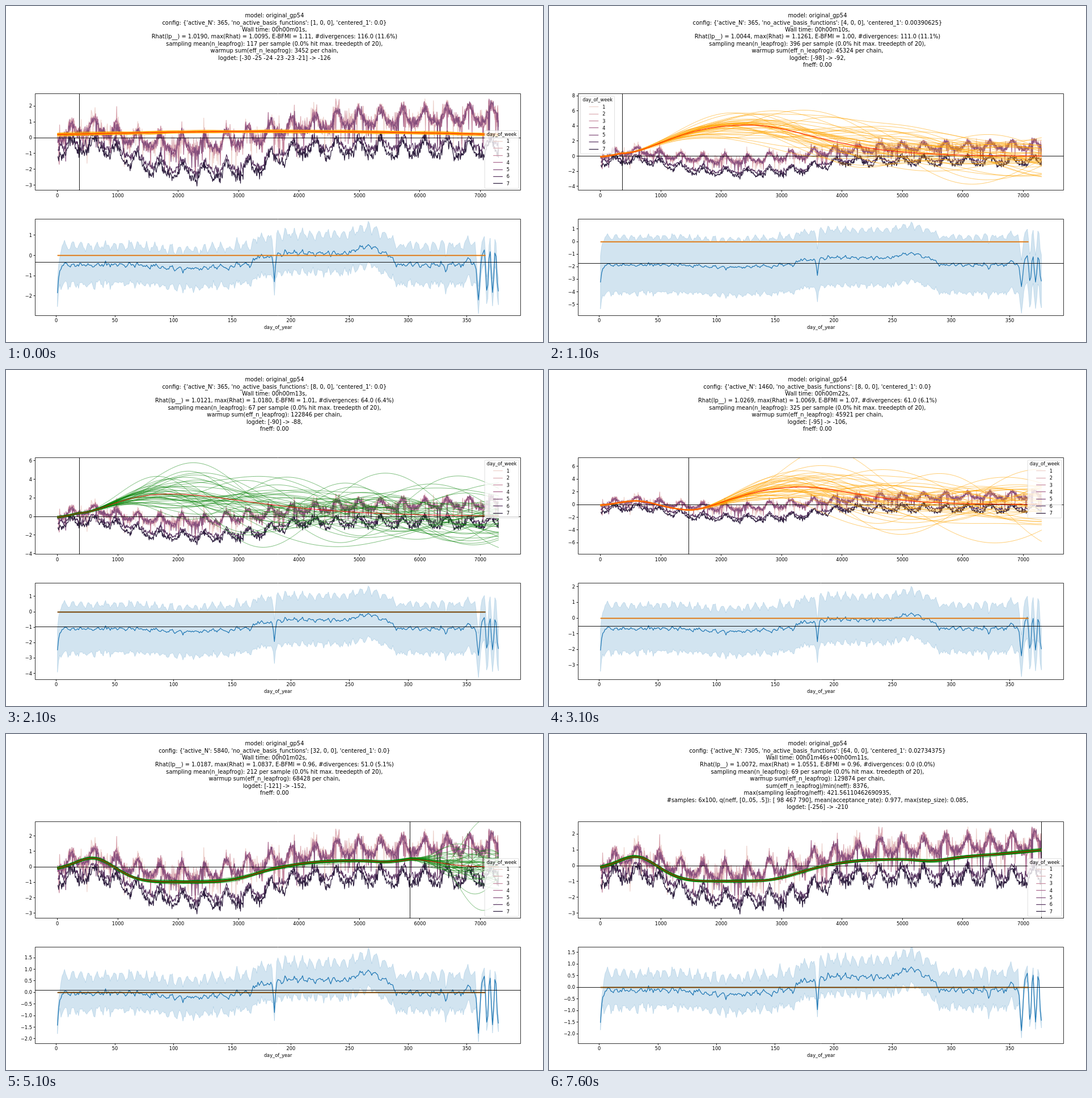
An HTML page with a canvas for the animation above (8.1 s loop, 947 by 592 pixels).

```html
<!DOCTYPE html>
<html lang="en">
<head>
<meta charset="utf-8">
<title>Model fits</title>
<style>
html, body { margin: 0; width: 100%; height: 100%; overflow: hidden; background: #fff; }
canvas { display: block; width: 947px; height: 592px; }
</style>
</head>
<body>
<canvas id="stage" width="947" height="592"></canvas>
<script>
const ctx = document.getElementById('stage').getContext('2d');
const LOOP = 8100, DAYS = 7305, TAU = Math.PI * 2;
const LEFT = 51.5, RIGHT = 907.5;
const TOP = { y: 154.5, b: 324.9, x: v => 90.6 + v * 0.10655 };
const BOT = { y: 375.2, b: 545.3, x: v => 88.7 + v * 2.068 };
const HUES = ['#edd1cb', '#dcacb3', '#c6899f', '#aa688f', '#824d7b', '#583561', '#2d1e3e'];
const FONT = '"DejaVu Sans", Verdana, sans-serif';

function seeded(a) {
  return () => {
    a = (a + 0x6D2B79F5) | 0;
    let t = Math.imul(a ^ (a >>> 15), 1 | a);
    t = (t + Math.imul(t ^ (t >>> 7), 61 | t)) ^ t;
    return ((t ^ (t >>> 14)) >>> 0) / 4294967296;
  };
}
const normal = r => Math.sqrt(-2 * Math.log(1 - r())) * Math.cos(TAU * r());
const bump = (x, c, w) => Math.exp(-(((x - c) / w) ** 2));
const shelf = (x, c, w) => Math.exp(-(((x - c) / w) ** 4));
const step = (x, c, w) => 1 / (1 + Math.exp((c - x) / w));

// Slow levels over the twenty years
const work = t => .2 + .55 * bump(t, 600, 350) - .75 * bump(t, 2250, 1100)
  + .8 * step(t, 3900, 450) + .45 * (t / DAYS) ** 2;
const rest = t => -.75 + .25 * bump(t, 600, 350) - 1.45 * shelf(t, 2400, 1250);
const fit = t => -.2 + .78 * bump(t, 600, 430) - .78 * shelf(t, 2150, 1150)
  + .6 * step(t, 3850, 250) + .6 * (Math.max(0, t - 4500) / 2805) ** 2 - .15 * bump(t, 5500, 350);

// Seven weekly series: five working days, then the lower weekend
function makeSeries() {
  const rnd = seeded(11);
  const common = Array.from({ length: 1043 }, () => normal(rnd) * .13);
  return HUES.map((_, d) => {
    const weekday = d < 5;
    let drift = 0;
    return common.map((shared, i) => {
      const t = i * 7 + d + 1, a = TAU * (t - 245) / 365.25;
      const season = .46 * Math.cos(a) + .15 * Math.cos(2 * a + .4);
      drift = .6 * drift + normal(rnd) * .1;
      let v = shared + drift + season * (d === 5 ? .75 : 1);
      v += weekday ? work(t) : rest(t) + (d === 5 ? .33 : 0);
      if (d < 4) v += normal(rnd) * .13 + (d < 2 && rnd() < .06 ? .6 : 0);
      if (weekday && rnd() < (d ? .025 : .07)) v -= (.6 + rnd() * .9) * (t > 3500 ? 1.3 : 1);
      return [t, Math.max(-3.05, Math.min(2.45, v))];
    });
  });
}

// Mean effect per day of year, with holiday dips and a restless end
function yearMean(d) {
  if (d > 364) return -.45 + 1.05 * Math.cos(TAU * (d - 365) / 4.7);
  return -.13 - .2 * bump(d, 112, 28) + .4 * step(d, 168, 1) + .17 * step(d, 188, .8)
    - .57 * step(d, 286, 1.5) + .33 * bump(d, 265, 11) - 1.4 * Math.exp((1 - d) / 1.3)
    - 1.25 * bump(d, 186, 1) - .33 * bump(d, 147, 1) - .3 * bump(d, 332, 1.2)
    + .3 * bump(d, 352, 2.5) - 1.75 * bump(d, 360, 1.4) + .6 * bump(d, 364, 2);
}
function makeYear() {
  const rnd = seeded(5);
  return Array.from({ length: 377 }, (_, i) => {
    const d = i + 1, special = d < 4 || d > 357 || Math.abs(d - 186) < 2;
    const rough = special ? 0 : 1, a = TAU * d / 7;
    return {
      d, half: special ? .3 : .72,
      m: yearMean(d) + rough * (.07 * Math.cos(a) + normal(rnd) * .06),
      up: rough * (.12 * Math.cos(a) + normal(rnd) * .06),
      down: rough * (.06 * Math.cos(a + 2) + normal(rnd) * .07)
    };
  });
}
const series = makeSeries(), year = makeYear();

// Key scenes. stage and basis are powers of two; zero and unit place the two
// y axes; peak and lag shape the forecast, spread and band its uncertainty.
const first = {
  i: 0, orange: true, stage: 0, basis: 0, c: '0.0', sec: 1, rhat: 1.019, max: 1.0095, bfmi: 1.11,
  div: 116, draws: 1000, leap: 117, warm: 3452, prior: '-30 -25 -24 -23 -23 -21', det: -126,
  zero: 232, unit: 27.9, zero2: 439.5, unit2: 35.7, level: -.33, band: .6,
  peak: 0, lag: 1000, spread: 0, legend: 'lr'
};
const second = { ...first, i: 2, orange: false, basis: 1, sec: 7, max: 1.0224, bfmi: 1.03, div: 95,
  leap: 142, warm: 40216, prior: -118, det: -98, fneff: 0, zero2: 437, level: -.4 };
const last = { ...second, i: 13, orange: true, stage: 5, basis: 6, sec: 85, bfmi: .98, div: 14,
  leap: 176, warm: 72048, prior: -187, det: -231, zero2: 449, unit2: 40.4, level: -.06, band: .12 };
const keys = [first, second,
  { ...second, i: 3, orange: true, basis: 2, c: '0.00390625', sec: 10, rhat: 1.0044, max: 1.1261, bfmi: 1,
    div: 111, leap: 396, warm: 45324, det: -92, prior: -98, zero: 264.6, unit: 13.32,
    zero2: 415, unit2: 22.1, level: -1.73, band: 2.1, peak: 4, lag: 2135, spread: 1.5, legend: 'ul' },
  { ...second, i: 5, basis: 3, sec: 13, rhat: 1.0121, max: 1.018, bfmi: 1.01, div: 64, leap: 67,
    warm: 122846, prior: -90, det: -88, zero: 258, unit: 16.35, zero2: 426, unit2: 27.1,
    level: -.97, band: 1.4, peak: 2.3, lag: 1600, spread: 1.5, legend: 'ur' },
  { ...second, i: 7, orange: true, stage: 2, basis: 3, sec: 22, rhat: 1.0269, max: 1.0069, bfmi: 1.07,
    div: 61, leap: 325, warm: 45921, prior: -95, det: -106, zero: 237, unit: 11.2, zero2: 437,
    unit2: 27.65, level: -.54, band: 1.3, peak: 3, lag: 1790, spread: 2, legend: 'ur' },
  { ...second, i: 9, stage: 2, basis: 5, sec: 28, rhat: 1.0098, max: 1.0212, bfmi: .99, div: 32,
    draws: 940, leap: 59, warm: 128160, prior: -105, det: -110, fneff: .07, zero: 250.5, unit: 11.82,
    zero2: 441, unit2: 31.2, level: -.27, band: 1.05, peak: 1.8, lag: 890, spread: 1.9, legend: 'ur' },
  { ...second, i: 11, stage: 4, basis: 5, sec: 62, rhat: 1.0187, max: 1.0837, bfmi: .96, div: 51,
    leap: 212, warm: 68428, prior: -121, det: -152, zero: 234, unit: 27.2, zero2: 455.3,
    unit2: 40.8, level: .1, band: .2, lag: 700, spread: .8 },
  last,
  { ...last, i: 16, orange: false, c: '0.02734375', sec: 106, rhat: 1.0072, max: 1.0551, bfmi: .96,
    div: 0, leap: 69, warm: 129874, prior: -256, det: -210, fneff: undefined, zero2: 446, unit2: 41,
    level: 0, band: .1, plus: '+00h00m11s', extra: ['sum(eff_n_leapfrog)/min(neff): 8376,',
      'max(sampling leapfrog/neff): 421.56110462690935,',
      '#samples: 6x100, q(neff, [0,.05, .5]): [ 98 467 790], mean(acceptance_rate): 0.977, max(step_size): 0.085,'] }
];

// Scenes without a key lie halfway between their neighbours
function sceneAt(i) {
  const next = keys.findIndex(k => k.i >= i), b = keys[next];
  if (b.i === i) return b;
  const a = keys[next - 1], u = (i - a.i) / (b.i - a.i), s = {};
  for (const k in a) {
    const mixes = typeof a[k] === 'number' && typeof b[k] === 'number';
    s[k] = mixes ? a[k] + (b[k] - a[k]) * u : b[k];
  }
  return { ...s, orange: false };
}
const scenes = Array.from({ length: 17 }, (_, i) => {
  const s = sceneAt(i);
  return { ...s, n: Math.min(DAYS, 365 * 2 ** Math.floor(s.stage)), k: 2 ** Math.floor(s.basis) };
});

function text(s, x, y, align = 'center', size = 8.22) {
  ctx.font = `${size}px ${FONT}`;
  ctx.textAlign = align;
  ctx.fillStyle = '#000';
  ctx.fillText(s, x, y);
}
function path(pts, color, width) {
  ctx.beginPath();
  pts.forEach(([x, y]) => ctx.lineTo(x, y));
  ctx.strokeStyle = color;
  ctx.lineWidth = width;
  ctx.stroke();
}
// Straight lines sit on pixel centres
const snap = v => Math.floor(v) + .5;
function hline(x1, x2, y, color = '#000', width = .9) {
  path([[x1, snap(y)], [x2, snap(y)]], color, width);
}
function vline(x, y1, y2) {
  path([[snap(x), y1], [snap(x), y2]], '#000', .9);
}

function title(s) {
  const two = v => String(Math.floor(v)).padStart(2, '0');
  const end = s.fneff === undefined;
  const rows = ['model: original_gp54',
    `config: {'active_N': ${s.n}, 'no_active_basis_functions': [${s.k}, 0, 0], 'centered_1': ${s.c}}`,
    `Wall time: 00h${two(s.sec / 60)}m${two(s.sec % 60)}s${s.plus || ''},`,
    `Rhat(lp__) = ${s.rhat.toFixed(4)}, max(Rhat) = ${s.max.toFixed(4)}, E-BFMI = ${s.bfmi.toFixed(2)}, `
      + `#divergences: ${Math.round(s.div)}.0 (${(100 * Math.round(s.div) / s.draws).toFixed(1)}%)`,
    `sampling mean(n_leapfrog): ${Math.round(s.leap)} per sample (0.0% hit max. treedepth of 20),`,
    `warmup sum(eff_n_leapfrog): ${Math.round(s.warm)} per chain,`,
    ...(s.extra || []),
    `logdet: [${typeof s.prior === 'number' ? Math.round(s.prior) : s.prior}] -> ${Math.round(s.det)}${end ? '' : ','}`];
  if (!end) rows.push(`fneff: ${s.fneff.toFixed(2)}`);
  rows.forEach((r, i) => text(r, 473.4, 20.2 + i * 12.43, 'center', 9.867));
}

function axes(p, zero, unit, gap, xGap, xMax) {
  ctx.strokeStyle = '#000';
  ctx.lineWidth = .8;
  ctx.strokeRect(LEFT, snap(p.y), RIGHT - LEFT, snap(p.b) - snap(p.y));
  for (let v = 0; v <= xMax; v += xGap) {
    vline(p.x(v), p.b, p.b + 2.9);
    text(v, p.x(v), p.b + 12.1);
  }
  for (let v = -8; v <= 8; v += gap) {
    const y = zero - v * unit;
    if (y < p.y || y > p.b) continue;
    hline(LEFT - 2.9, LEFT, y);
    text((v < 0 ? '\u2212' : '') + Math.abs(v).toFixed(gap < 1 ? 1 : 0), LEFT - 5.6, y + 3.1, 'right');
  }
}

function clipped(p, draw) {
  ctx.save();
  ctx.beginPath();
  ctx.rect(LEFT, p.y, RIGHT - LEFT, p.b - p.y);
  ctx.clip();
  draw();
  ctx.restore();
}

// Random smooth wave with unit variance
function wave(rnd, cycles) {
  const parts = Array.from({ length: 4 }, () =>
    [normal(rnd) * .7, (.15 + rnd() * cycles) * TAU / DAYS, rnd() * TAU]);
  return t => parts.reduce((sum, [a, f, p]) => sum + a * Math.cos(f * t + p), 0);
}

// The fit up to the last active day, then an overshoot that dies away
function trendMean(s, t) {
  if (s.basis < 2) return .2 + .2 * Math.sin(Math.PI * t / DAYS);
  const u = Math.max(0, t - s.n), r = u / s.lag;
  const power = r < 1 ? 2 : s.orange ? 5 : 2;
  return fit(Math.min(t, s.n)) * bump(r, 0, .9) + s.peak * (r * Math.exp(1 - r)) ** power;
}

function trends(s, index, y) {
  const rnd = seeded(index * 97 + 3);
  const ts = Array.from({ length: 245 }, (_, i) => i * DAYS / 244), base = ts.map(t => trendMean(s, t));
  const color = s.orange ? 'rgba(255,165,0,.55)' : 'rgba(0,128,0,.5)';
  for (let i = 0; i < 40; i++) {
    const far = wave(rnd, 3600 / s.lag), near = wave(rnd, 5);
    path(ts.map((t, j) => {
      const fan = s.spread * (1 - bump(Math.max(0, t - s.n), 0, .95 * s.lag));
      return [TOP.x(t), y(base[j] + .045 * near(t) + fan * far(t))];
    }), color, 1);
  }
  path(ts.map((t, j) => [TOP.x(t), y(base[j])]), s.orange ? '#ff2a00' : 'rgba(255,0,0,.75)', 1.2);
}

function legend(place) {
  const x = place === 'ul' ? 55.6 : 844.2, y = place === 'lr' ? 219.4 : 158.7;
  ctx.beginPath();
  ctx.roundRect(x, y, 60, 102, 1.7);
  ctx.fillStyle = 'rgba(255,255,255,.8)';
  ctx.fill();
  ctx.strokeStyle = 'rgba(204,204,204,.8)';
  ctx.lineWidth = .8;
  ctx.stroke();
  text('day_of_week', x + 30, y + 9.6);
  HUES.forEach((color, i) => {
    const row = y + 19 + i * 12.4;
    hline(x + 15, x + 31.7, row, color, 1.23);
    text(i + 1, x + 41.2, row + 3);
  });
}

function drawTop(s, index) {
  const y = v => s.zero - v * s.unit;
  clipped(TOP, () => {
    series.forEach((pts, d) => path(pts.map(([t, v]) => [TOP.x(t), y(v)]), HUES[d], 1.23));
    hline(LEFT, RIGHT, y(0));
    vline(TOP.x(s.n), TOP.y, TOP.b);
    trends(s, index, y);
  });
  axes(TOP, s.zero, s.unit, s.unit > 20 ? 1 : 2, 1000, 7000);
  legend(s.legend);
}

function drawBottom(s) {
  const y = v => s.zero2 - (v + s.level) * s.unit2;
  const edge = (key, sign) => year.map(p =>
    [BOT.x(p.d), y(p.m + sign * (Math.hypot(p.half, s.band) + p[key]))]);
  clipped(BOT, () => {
    ctx.beginPath();
    edge('up', 1).concat(edge('down', -1).reverse()).forEach(([a, b]) => ctx.lineTo(a, b));
    ctx.closePath();
    ctx.fillStyle = ctx.strokeStyle = 'rgba(31,119,180,.2)';
    ctx.lineWidth = .9;
    ctx.fill();
    ctx.stroke();
    path(year.map(p => [BOT.x(p.d), y(p.m)]), '#1f77b4', 1.23);
    hline(LEFT, RIGHT, y(0));
    const from = BOT.x(1), to = BOT.x(366);
    hline(from, to, s.zero2, s.orange ? '#f59a10' : '#5f5200', 1.8);
    hline(from, to, s.zero2, s.orange ? '#d0601a' : '#8b3000', .9);
  });
  axes(BOT, s.zero2, s.unit2, s.unit2 > 38 ? .5 : 1, 50, 350);
  text('day_of_year', 479.7, 568.6);
}

let shown = -1;
function tick() {
  const t = performance.now() % LOOP;
  const index = t < 100 ? 0 : Math.min(16, 1 + Math.floor((t - 100) / 500));
  if (index !== shown) {
    shown = index;
    const s = scenes[index];
    ctx.fillStyle = '#fff';
    ctx.fillRect(0, 0, 947, 592);
    ctx.lineJoin = 'round';
    title(s);
    drawTop(s, index);
    drawBottom(s);
  }
  requestAnimationFrame(tick);
}
tick();
</script>
</body>
</html>
```
